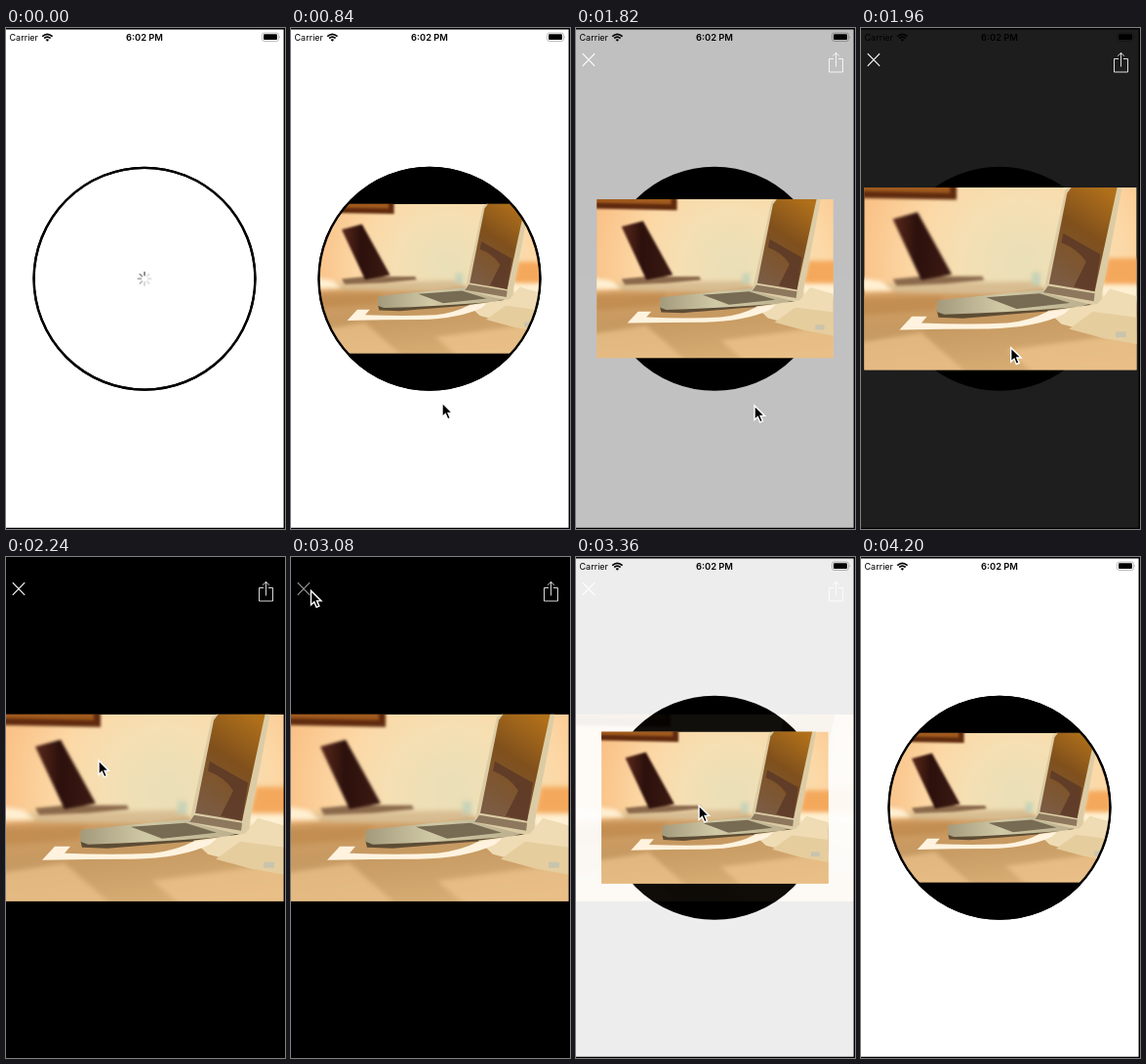
Animation of 286 by 512 pixels, one loop 4270 ms. Source, as an HTML page:

```html
<!DOCTYPE html>
<html lang="en">
<head>
<meta charset="utf-8">
<title>Photo viewer</title>
<style>
html, body { margin: 0; width: 100%; height: 100%; overflow: hidden; background: #fff; }
svg { display: block; width: 286px; height: 512px; }
text { font: 9px Inter, "Liberation Sans", sans-serif; }
</style>
</head>
<body>
<svg viewBox="0 0 286 512">
  <defs>
    <radialGradient id="wall" gradientUnits="userSpaceOnUse" cx="165" cy="78" r="185">
      <stop offset="0" stop-color="#e9dfb8"/>
      <stop offset=".35" stop-color="#f5dfb3"/>
      <stop offset=".6" stop-color="#fcd8a6"/>
      <stop offset="1" stop-color="#f9bd80"/>
    </radialGradient>
    <linearGradient id="table" x2=".35" y2="1">
      <stop offset="0" stop-color="#d39c60"/>
      <stop offset=".45" stop-color="#c69a62"/>
      <stop offset="1" stop-color="#dab077"/>
    </linearGradient>
    <linearGradient id="screen" x1=".75" y1="0" x2=".3" y2="1">
      <stop offset="0" stop-color="#b0701a"/>
      <stop offset=".45" stop-color="#80501c"/>
      <stop offset="1" stop-color="#7b5c44"/>
    </linearGradient>
    <linearGradient id="lid">
      <stop offset="0" stop-color="#5a2a1b"/>
      <stop offset=".4" stop-color="#2c100c"/>
      <stop offset="1" stop-color="#3c1a12"/>
    </linearGradient>
    <linearGradient id="metal">
      <stop offset="0" stop-color="#a39a7c"/>
      <stop offset=".4" stop-color="#d0c9a6"/>
      <stop offset="1" stop-color="#b9ac8a"/>
    </linearGradient>
    <filter id="soft" x="-20%" y="-20%" width="140%" height="140%" color-interpolation-filters="sRGB"><feGaussianBlur stdDeviation="2.4"/></filter>
    <filter id="haze" x="-20%" y="-20%" width="140%" height="140%" color-interpolation-filters="sRGB"><feGaussianBlur stdDeviation="1.4"/></filter>
    <filter id="crisp" x="-20%" y="-20%" width="140%" height="140%" color-interpolation-filters="sRGB"><feGaussianBlur stdDeviation=".7"/></filter>
    <clipPath id="frame"><path d="M0 0H286V191H0z"/></clipPath>
    <clipPath id="disc"><circle cx="142" cy="256.2" r="113.5"/></clipPath>

    <g id="photo" clip-path="url(#frame)">
      <path fill="url(#wall)" d="M0 0H286V191H0z"/>
      <g filter="url(#soft)">
        <path fill="#f4a85c" d="M256 74H300V101H250z"/>
        <path fill="url(#table)" d="M-9 112Q70 103 300 108V205H-9z"/>
        <path fill="#b98245" d="M-9 117L84 114 74 128 -9 134z" opacity=".5"/>
        <path fill="#edc48c" d="M-9 163L60 152 120 205H-9z" opacity=".7"/>
        <path fill="#efc78f" d="M150 170L300 150V205H190z" opacity=".7"/>
        <path fill="#fff0d2" d="M246 102H300V118L250 121zM-9 94L18 98 30 108H-9z"/>
        <path fill="#d8bd92" d="M22 101L178 98 190 106 150 112 34 110z"/>
        <path fill="#c4d2b8" d="M176 89h9v13h-9z"/>
      </g>
      <g filter="url(#haze)">
        <path fill="#5f2a0e" d="M-5 -5H97V13L-5 11z"/>
        <path fill="#b66a22" d="M-5 -5H90V6L-5 4z" opacity=".75"/>
        <path fill="#8b6a4c" d="M30 96L60 93 124 93 126 97 84 101 34 103z"/>
        <path fill="url(#lid)" d="M30 33L56 26 92 91 60 97z"/>
      </g>
      <g filter="url(#crisp)">
        <path fill="#5d4c34" d="M76 128L240 118 243 123 226 127Q150 133 104 137L78 136z"/>
        <path fill="url(#metal)" d="M77 118L186 107 246 119 226 125Q150 131 84 133L76 130z"/>
        <path fill="#786b53" d="M128 115L184 111 216 121 160 127z"/>
        <path fill="#dccca5" d="M211 3L218 -2H271L247 125 188 110z"/>
        <path fill="url(#screen)" d="M213 6L219 -2H266L242 109 194 101z"/>
        <path fill="#5b3827" d="M209 48Q226 58 248 70L242 109 220 104 233 78Q224 64 207 58z" opacity=".8"/>
        <path fill="#8d785e" d="M193 103L242 111 241 119 188 110z"/>
        <path fill="#efdcb4" d="M192 129L245 122 258 106 286 114V164L252 155 207 143z"/>
        <path fill="#e6cd9e" d="M215 148L240 130 286 136V164L252 158z"/>
        <path fill="#c9c4ad" d="M264 151h11v6h-11z"/>
        <path fill="#fff3df" d="M37 149L50 135H66L60 142Q110 144 150 142 175 139 192 130L216 127 209 133Q180 147 130 148 82 148 37 149z"/>
      </g>
    </g>
  </defs>

  <path fill="#fff" d="M0 0H286V512H0z"/>

  <text x="3.5" y="12.8">Carrier</text>
  <text x="142" y="12.8" text-anchor="middle" style="font-size:9.3px;font-weight:600">6:02 PM</text>
  <g fill="none" stroke="#000" stroke-width="1.7">
    <path d="M37.2 8.6Q42.3 4 47.6 8.6M39.2 10.5Q42.3 7.8 45.6 10.5"/>
    <path stroke="none" fill="#000" d="M40.6 11.9Q42.3 10.4 44.1 11.9L42.3 13.7z"/>
  </g>
  <rect x="262.5" y="5" width="17" height="8.4" rx="2.2" fill="none" stroke="#aaa" stroke-width=".8"/>
  <rect x="264" y="6.3" width="14" height="5.8" rx="1.1"/>
  <path fill="#aaa" d="M280.4 7.8q1.5 1.4 0 2.8z"/>

  <circle id="ring" cx="142" cy="256.2" r="113.4" stroke="#000" stroke-width="2.3"/>
  <g id="spinner" stroke="#3c3c43" stroke-width="1.9" stroke-linecap="round"></g>
  <g id="thumb" clip-path="url(#disc)"><use href="#photo" transform="translate(28 179.7) scale(.8)"/></g>
  <circle id="rim" cx="142" cy="256.2" r="113.4" fill="none" stroke="#000" stroke-width="2.3"/>

  <g id="viewer">
    <path d="M0 0H286V512H0z"/>
    <use id="still" href="#photo" y="160.7"/>
    <g fill="none" stroke="#fff">
      <path id="close" stroke-width="1.1" d="M6.8 26.2L19.2 38.8M19.2 26.2L6.8 38.8"/>
      <path opacity=".85" d="M264 31.5H259.5V45H273.5V31.5H269M266.5 39.5V25.5M263.2 28.7L266.5 25.3 269.8 28.7"/>
    </g>
  </g>
  <use id="flying" href="#photo"/>

  <path d="M0 .7H286M285.3 0V512M0 511.4H286" stroke="#000" stroke-width="1.4"/>
  <path id="cursor" stroke="#fff" stroke-width="1.4" d="M0 0V14.4L3.3 11.4 5.6 16.8 8.4 15.6 6.1 10.4H10.5z"/>
</svg>
<script>
const LOOP = 4270, STEP = 70;
const LOADED = 840, OPEN = 1724, CLOSE = 3108, ZOOM = 300;
// Pointer stops: time, x, y
const path = [
  [210, 155, 474], [700, 155, 383], [1330, 155, 383], [1540, 163, 325], [1680, 170, 340],
  [1820, 183, 386], [2240, 95, 208], [2520, 72, 150], [2940, 20.5, 34.5], [3080, 20.5, 34.5],
  [3360, 126, 254], [3640, 150, 340], [4060, 165, 515]
];
const $ = id => document.getElementById(id);
const show = (id, on) => $(id).style.display = on ? "" : "none";
const ease = u => (u = Math.min(1, Math.max(0, u)), u * u * (3 - 2 * u));
const mix = (a, b, u) => a + (b - a) * u;

for (let i = 0; i < 8; i++) {
  const petal = document.createElementNS("http://www.w3.org/2000/svg", "path");
  petal.setAttribute("d", "M0 3.7V6.6");
  petal.setAttribute("transform", `translate(142 256.3) rotate(${i * 45})`);
  $("spinner").append(petal);
}

function pointer(t) {
  const i = path.findIndex(p => p[0] > t);
  show("cursor", i > 0);
  if (i < 1) return;
  const [a, b] = [path[i - 1], path[i]];
  const u = (t - a[0]) / (b[0] - a[0]);
  $("cursor").setAttribute("transform", `translate(${mix(a[1], b[1], u)} ${mix(a[2], b[2], u)})`);
}

function draw(t) {
  const loaded = t >= LOADED;
  const closing = t >= CLOSE;
  const p = ease((t - OPEN) / ZOOM) - ease((t - CLOSE) / ZOOM);
  const moving = p > 0;

  $("ring").setAttribute("fill", loaded ? "#000" : "#fff");
  show("spinner", !loaded);
  show("thumb", loaded && !moving);
  show("viewer", moving);
  show("flying", moving);
  show("still", closing);
  show("rim", !moving);

  const head = Math.floor((t + 40) / 100);
  [...$("spinner").children].forEach((petal, i) => {
    const age = (head + 4 - i + 16) % 8;
    petal.style.opacity = Math.max(.15, .6 - age * .1);
  });

  $("viewer").style.opacity = p;
  $("close").style.opacity = t > 3050 && !closing ? .6 : 1;
  const s = mix(.8, 1, p);
  $("flying").setAttribute("transform", `translate(${mix(28, 0, p)} ${mix(179.7, 160.7, p)}) scale(${s})`);
  pointer(t);
}

const start = performance.now();
function tick() {
  const t = (performance.now() - start) % LOOP;
  draw(Math.floor(t / STEP) * STEP);
  requestAnimationFrame(tick);
}
tick();
</script>
</body>
</html>
```
